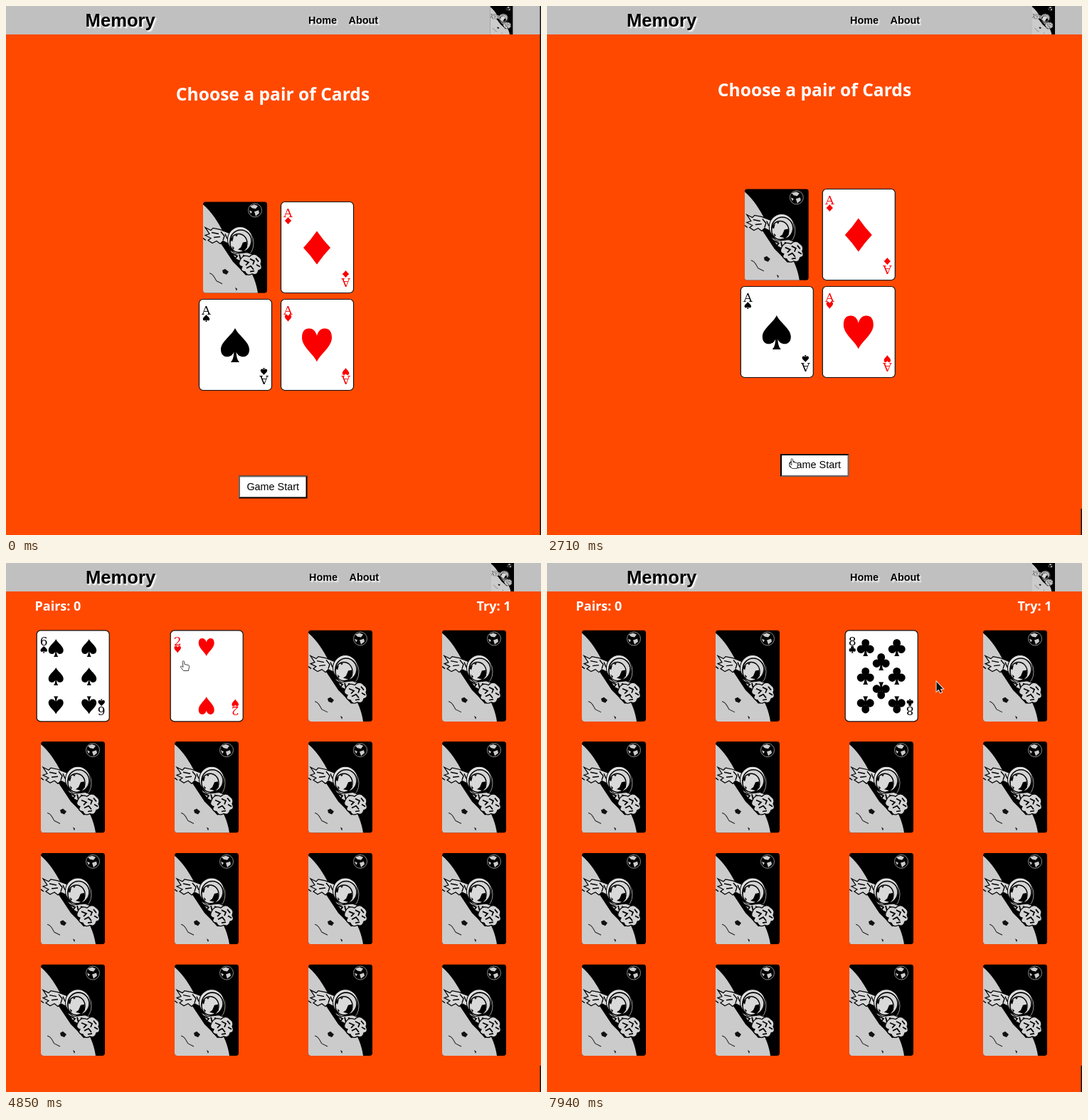
These frames come from a looping animation (752x744 px, 8000 ms). An HTML page with a canvas:

```html
<!DOCTYPE html>
<html lang="en">
<head>
<meta charset="utf-8">
<title>Memory</title>
<style>
html, body { margin: 0; width: 100%; height: 100%; overflow: hidden; background: #ff4900; }
canvas { display: block; }
</style>
</head>
<body>
<canvas id="stage" width="752" height="744"></canvas>
<script>
const ctx = document.getElementById('stage').getContext('2d');
const LOOP = 8000;
const SANS = '"Liberation Sans", Arial, sans-serif';
const HUMANIST = '"Noto Sans", sans-serif';
const SERIF = '"DejaVu Serif", "Noto Serif", serif';
const RED = '#fb0000';

// Suit outlines fill the box from -1 to 1.
const suits = {
  heart: new Path2D('M0 1C-.15 .6-1 .1-1-.45C-1-.85-.8-1-.52-1C-.25-1-.05-.8 0-.55C.05-.8 .25-1 .52-1C.8-1 1-.85 1-.45C1 .1 .15 .6 0 1Z'),
  spade: new Path2D('M0-1C.2-.6 1-.2 1 .25C1 .55 .8 .68 .55 .68C.35 .68 .18 .6 .08 .4C.1 .7 .15 .85 .3 1H-.3C-.15 .85-.1 .7-.08 .4C-.18 .6-.35 .68-.55 .68C-.8 .68-1 .55-1 .25C-1-.2-.2-.6 0-1Z'),
  diamond: new Path2D('M0-1Q.46-.46 1 0Q.46 .46 0 1Q-.46 .46-1 0Q-.46-.46 0-1Z'),
  club: new Path2D('M-.45-.52A.45 .48 0 1 1 .45-.52A.45 .48 0 1 1-.45-.52ZM-1 .2A.47 .48 0 1 1-.06 .2A.47 .48 0 1 1-1 .2ZM.06 .2A.47 .48 0 1 1 1 .2A.47 .48 0 1 1 .06 .2ZM-.12-.1H.12L.1 .3Q.12 .8 .3 1H-.3Q-.12 .8-.1 .3Z')
};

// Card back, 90 by 128.
const art = {
  moon: new Path2D('M0 4C12 14 22 30 28 42L62 88C70 102 75 114 77 128H0Z'),
  shade: new Path2D('M22 54L34 57L44 72L56 80L66 102L60 103L50 92L42 84Z'),
  arm: new Path2D('M3 36L11 40L14 37L24 39L37 44L36 59L28 55L24 59L19 55L13 58L7 54L11 51L3 47L9 45Z'),
  armInk: new Path2D('M12 43L22 45M15 50L24 49M25 42L30 48L28 54M31 45L34 52M0 51L4 54'),
  chest: new Path2D('M36 66L46 73L62 71L70 74L66 84L54 84L46 80Z'),
  chestInk: new Path2D('M40 72L48 76L45 80M51 74L53 82M56 75L64 78L58 82'),
  glove: new Path2D('M52 82Q56 73 65 77Q72 70 78 77Q84 81 81 87Q85 95 78 96Q76 104 69 101Q62 105 59 98Q51 97 55 91Q48 89 52 82Z'),
  gloveInk: new Path2D('M57 82L64 85L60 89M66 80L72 83L70 88M74 79L78 84M61 93L67 90L71 95M75 88L80 91M66 98L72 97'),
  visorInk: new Path2D('M56 57L61 56L62 64L57 69L49 67L53 64ZM38 53L43 49L41 56ZM45 47L49 46L47 49ZM41 62L44 65L42 67Z'),
  rocks: new Path2D('M27 96L31 94L36 98L33 102L28 100ZM45 120L48 122L47 125Z'),
  crater: new Path2D('M9 100C15 101 16 107 19 111L27 115'),
  land: new Path2D('M66 6L72 4L77 6L74 10L69 9ZM65 12L69 14L67 17ZM72 14L78 12L79 16L74 20Z')
};

const arrow = new Path2D('M.5 0V13.5L3.6 10.8L5.8 15.6L8 14.6L5.9 9.9H9.8Z');
const hand = new Path2D('M3 1.5Q4.5 0 5.5 1.5L6 5.5L11 6.5Q13 7 12.5 9L11.5 14.5H4.5L.5 9.5Q0 8 1.5 8L4 9.5Z');

// Cursor stops: time, x, y, shape.
const stops = [
  [1280, 0, 133, arrow], [1750, 208, 226, arrow], [1880, 208, 226, arrow], [2070, 318, 618, arrow],
  [2140, 326, 626, hand], [2470, 340, 636, hand], [3120, 340, 636, hand], [3580, 46, 110, hand],
  [3650, 53, 138, hand], [4230, 53, 138, hand], [4700, 245, 137, hand], [5190, 245, 137, hand],
  [5340, 219, 260, hand], [5510, 220, 259, arrow], [6330, 220, 259, arrow], [6490, 234, 235, arrow],
  [6840, 234, 235, arrow], [7250, 417, 184, hand], [7370, 470, 168, hand], [7790, 470, 168, hand],
  [7860, 508, 168, hand], [7940, 547, 167, arrow], [LOOP, 547, 167, arrow]
];

// Pips: x, y, and 1 when upside down.
const deck = {
  aceDiamond: { mark: 'A', suit: 'diamond', size: [19, 23.5], pips: [[51, 65]] },
  aceSpade: { mark: 'A', suit: 'spade', size: [20, 24], pips: [[51, 65]] },
  aceHeart: { mark: 'A', suit: 'heart', size: [21, 23.5], pips: [[51, 65]] },
  six: { mark: '6', suit: 'spade', size: [10.5, 12.5],
    pips: [[27.5, 25], [74, 25], [27.5, 65], [74, 65], [27.5, 105.5, 1], [74, 105.5, 1]] },
  two: { mark: '2', suit: 'heart', size: [11, 12.5], pips: [[51, 24], [51, 106, 1]] },
  eight: { mark: '8', suit: 'club', size: [12, 12],
    pips: [[29, 24.5], [73, 24.5], [51, 44.5], [29, 64.5], [73, 64.5], [51, 85, 1], [29, 105, 1], [73, 105, 1]] }
};

function at(x, y, draw) {
  ctx.save();
  ctx.translate(x, y);
  draw();
  ctx.restore();
}

function text(string, x, y, font, color, align = 'left') {
  ctx.font = font;
  ctx.fillStyle = color;
  ctx.textAlign = align;
  ctx.fillText(string, x, y);
}

function rect(x, y, w, h, color) {
  ctx.fillStyle = color;
  ctx.fillRect(x, y, w, h);
}

function shape(path, fill, stroke, width = 1) {
  if (fill) { ctx.fillStyle = fill; ctx.fill(path); }
  if (stroke) { ctx.strokeStyle = stroke; ctx.lineWidth = width; ctx.stroke(path); }
}

function ellipse(x, y, rx, ry, fill, stroke, width) {
  const path = new Path2D();
  path.ellipse(x, y, rx, ry, 0, 0, Math.PI * 2);
  shape(path, fill, stroke, width);
}

function cardBack(x, y, w = 90, h = 128.5, radius = 4) {
  at(x, y, () => {
    ctx.scale(w / 90, h / 128);
    ctx.beginPath();
    ctx.roundRect(0, 0, 90, 128, radius);
    ctx.clip();
    rect(0, 0, 90, 128, '#000');
    shape(art.moon, '#cbcbcb');
    shape(art.rocks, '#111');
    shape(art.crater, null, '#222');
    ellipse(73, 12, 9.5, 9.5, '#000', '#aaa', .8);
    shape(art.land, '#ccc');
    shape(art.shade, '#000');
    shape(art.arm, '#d8d8d8', '#000', 1.2);
    shape(art.armInk, null, '#000', 1.4);
    ellipse(61, 58, 10, 17, '#000', '#bbb', .8);
    shape(art.chest, '#d2d2d2', '#000');
    shape(art.chestInk, null, '#000', 1.8);
    ellipse(52, 53, 17.5, 18, '#e0e0e0', '#000', 1);
    ellipse(53, 55, 15, 15.5, '#d4d4d4', '#000', 1.6);
    ellipse(50, 58, 12, 13, '#d9d9d9', '#000', 1.4);
    shape(art.visorInk, '#000');
    shape(art.glove, '#d4d4d4', '#000', 1.2);
    shape(art.gloveInk, null, '#000', 1.7);
  });
}

function pip(suit, x, y, rx, ry, flipped, color) {
  at(x, y, () => {
    ctx.scale(rx, flipped ? -ry : ry);
    shape(suits[suit], color);
  });
}

function cardFace(x, y, { mark, suit, size, pips }) {
  const color = suit === 'heart' || suit === 'diamond' ? RED : '#000';
  const corner = () => {
    text(mark, 10.5, 21.5, '17px ' + SERIF, color, 'center');
    pip(suit, 10.5, 27, 4.7, 5, false, color);
  };
  at(x, y, () => {
    ctx.beginPath();
    ctx.roundRect(.5, .5, 102, 128, 5.5);
    ctx.fillStyle = '#fff';
    ctx.fill();
    ctx.strokeStyle = '#111';
    ctx.lineWidth = 1.2;
    ctx.stroke();
    corner();
    at(102, 129, () => { ctx.rotate(Math.PI); corner(); });
    for (const [px, py, flipped] of pips) pip(suit, px, py, ...size, flipped, color);
  });
}

function header(shift) {
  rect(0, 0, 752, 40, '#c0c0c0');
  ctx.save();
  ctx.shadowColor = '#fff';
  ctx.shadowOffsetX = ctx.shadowOffsetY = 2;
  ctx.shadowBlur = 2;
  text('Memory', 111.6 + shift * .4, 29, 'bold 25.6px ' + SANS, '#000');
  text('Home', 425 + shift, 25, 'bold 14.4px ' + SANS, '#000');
  text('About', 481.6 + shift, 25, 'bold 14.4px ' + SANS, '#000');
  ctx.restore();
  cardBack(680.6 + shift * 1.4, 0, 32, 40, 0);
}

function button(x, y, pressed) {
  const [upper, lower] = pressed ? ['#000', '#666'] : ['#666', '#000'];
  rect(x, y, 96.5, 32, lower);
  ctx.beginPath();
  ctx.moveTo(x, y + 32);
  ctx.lineTo(x, y);
  ctx.lineTo(x + 96.5, y);
  ctx.lineTo(x + 94.5, y + 2);
  ctx.lineTo(x + 2, y + 30);
  ctx.fillStyle = upper;
  ctx.fill();
  rect(x + 2, y + 2, 92.5, 28, '#fff');
  text('Game Start', x + 48.2, y + 20, '14.4px ' + SANS, '#000', 'center');
}

function startScreen(t, shift) {
  const left = 271 + shift * .8;
  const top = shift ? 257 : 275;
  text('Choose a pair of Cards', 375 + shift, shift ? 127 : 133, 'bold 24.6px ' + HUMANIST, '#fff', 'center');
  cardBack(left + 6, top + .3);
  cardFace(left + 115, top, deck.aceDiamond);
  cardFace(left, top + 137, deck.aceSpade);
  cardFace(left + 115, top + 137, deck.aceHeart);
  button(327 + shift, shift ? 630 : 660.5, t >= 2710);
}

function faceUp(index, t) {
  if (index === 0 && t >= 4000 && t < 6840) return deck.six;
  if (index === 1 && t >= 4850 && t < 6840) return deck.two;
  if (index === 2 && t >= 7540) return deck.eight;
}

function board(t) {
  const font = 'bold 18px ' + HUMANIST;
  text('Pairs: 0', 40.5, 66.5, font, '#fff');
  text('Try: ' + (t < 4850 ? 0 : 1), 661.5, 66.5, font, '#fff');
  for (let i = 0; i < 16; i++) {
    const x = 49 + (i % 4) * 188;
    const y = 94.4 + Math.floor(i / 4) * 156.7;
    const face = faceUp(i, t);
    if (face) cardFace(x - 6.3, y, face);
    else cardBack(x, y);
  }
}

function cursor(t) {
  const next = stops.findIndex(stop => stop[0] > t);
  if (next < 1) return;
  const [t0, x0, y0, form] = stops[next - 1];
  const [t1, x1, y1] = stops[next];
  const k = (t - t0) / (t1 - t0);
  at(x0 + (x1 - x0) * k, y0 + (y1 - y0) * k, () => {
    if (form === arrow) {
      shape(arrow, null, '#eee', 1.8);
      shape(arrow, '#111');
    } else {
      shape(hand, '#fff', '#444', 1);
    }
  });
}

function render(now) {
  const t = now % LOOP;
  const shift = t < 210 ? 0 : 1;
  rect(0, 0, 752, 744, '#ff4900');
  header(shift);
  if (t < 2850) startScreen(t, shift);
  else board(t);
  const edge = shift ? 707 : 0;
  rect(750.5, edge, 1.5, 744 - edge, '#111');
  cursor(t);
  requestAnimationFrame(frame);
}

let begin;
function frame(now) {
  begin ??= now;
  render(now - begin);
}
requestAnimationFrame(frame);
</script>
</body>
</html>
```
